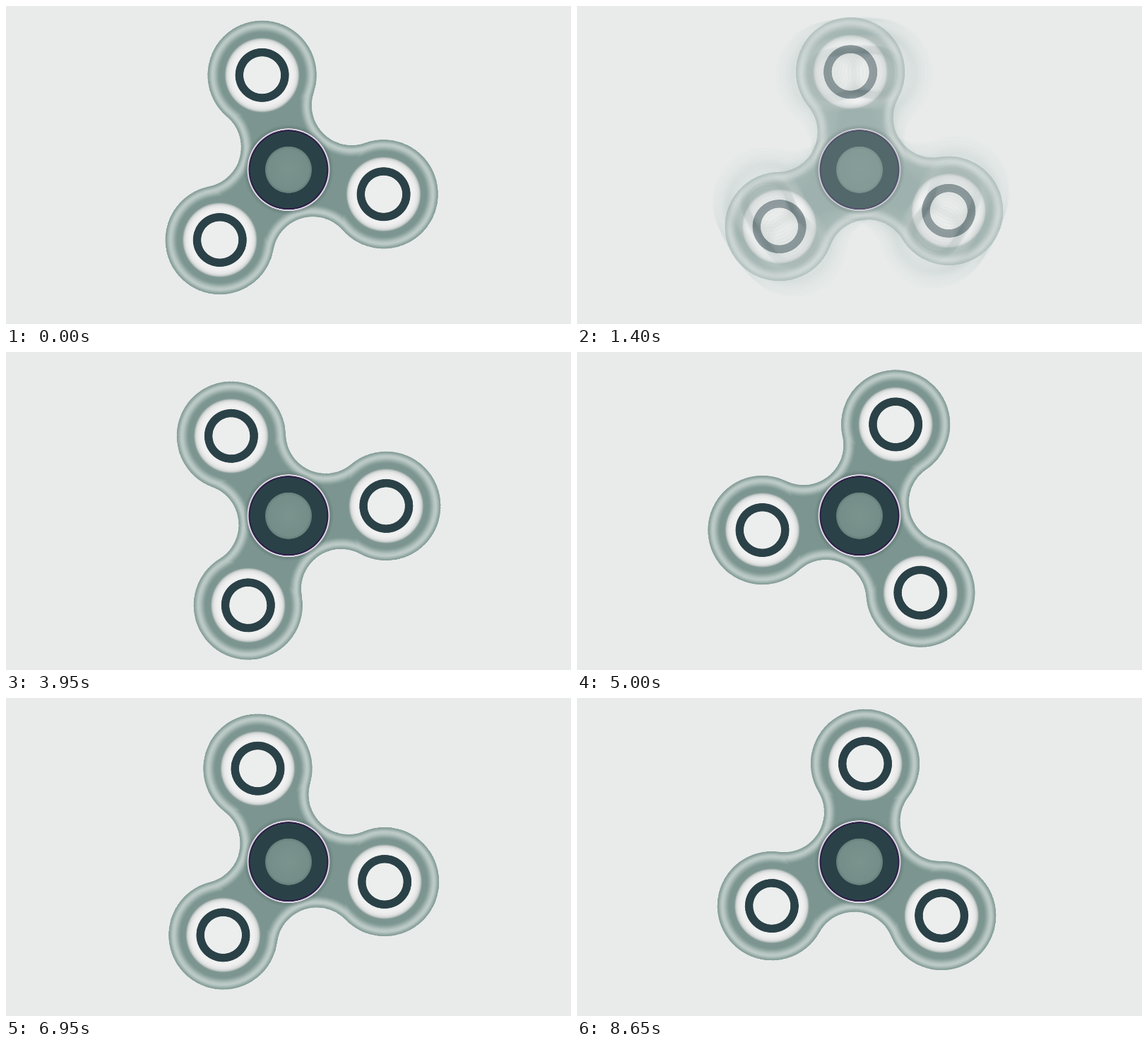
An HTML page with a canvas for the animation above (8.75 s loop, 800 px wide and 450 px high).

```html
<!DOCTYPE html>
<html lang="en">
<head>
<meta charset="utf-8">
<title>Spinner</title>
<style>
  html, body { margin: 0; width: 100%; height: 100%; overflow: hidden; background: #e8ebea; }
  canvas { display: block; width: 800px; height: 450px; }
</style>
</head>
<body>
<canvas id="stage" width="800" height="450"></canvas>
<script>
const LOOP = 8750, STEP = 50, LAST_STEP = 173;
const ARM = 139, LOBE = 77, FILLET_DIST = 127.7, FILLET = 56.7;
const BACK = '#e8ebea', BODY = '#7c9590', DARK = '#2a4147';
const RAD = Math.PI / 180;
const ctx = document.getElementById('stage').getContext('2d');

// A quick flick, then a long coast: [step, degrees left to turn, degrees per step]
const spin = [
  [0, 5384.4, 13.3], [28, 4074.7, 57], [52, 2770.8, 49], [79, 1644.3, 36],
  [122, 482.1, 18.3], [156, 66.8, 5.9], [163, 31.6, 4.2], [173, 3.3, 1.5]
];

function angleAt(step) {
  const i = Math.min(spin.findLastIndex(k => k[0] <= step), spin.length - 2);
  const [s0, a0, v0] = spin[i], [s1, a1, v1] = spin[i + 1];
  const h = s1 - s0, u = (step - s0) / h, w = 1 - u;
  return a0 * w * w * (1 + 2 * u) + a1 * u * u * (3 - 2 * u)
    - v0 * h * u * w * w + v1 * h * u * u * w;
}

const ramp = (t, from, to) => {
  const u = Math.min(1, Math.max(0, (t - from) / (to - from)));
  return u * u * (3 - 2 * u);
};

const blurAt = time => ramp(time, 450, 1000) * (1 - ramp(time, 1850, 2500));

const polar = (r, deg) => [r * Math.sin(deg * RAD), -r * Math.cos(deg * RAD)];

function disc(c, x, y, r, fill) {
  c.beginPath();
  c.arc(x, y, r, 0, 2 * Math.PI);
  c.fillStyle = fill;
  c.fill();
}

function radial(c, x, y, r, stops) {
  const g = c.createRadialGradient(x, y, 0, x, y, r);
  stops.forEach(([at, color]) => g.addColorStop(at / r, color));
  return g;
}

function outline() {
  const path = new Path2D();
  for (let lobe = 0; lobe < 360; lobe += 120) {
    const [x, y] = polar(ARM, lobe);
    const [fx, fy] = polar(FILLET_DIST, lobe + 60);
    const [px, py] = polar(FILLET_DIST, lobe - 60);
    const [nx, ny] = polar(ARM, lobe + 120);
    path.arc(x, y, LOBE, Math.atan2(py - y, px - x), Math.atan2(fy - y, fx - x));
    path.arc(fx, fy, FILLET, Math.atan2(y - fy, x - fx), Math.atan2(ny - fy, nx - fx), true);
  }
  path.closePath();
  return path;
}

function sprite(half, paint) {
  const canvas = document.createElement('canvas');
  canvas.width = canvas.height = half * 4;
  const c = canvas.getContext('2d');
  c.scale(2, 2);
  c.translate(half, half);
  paint(c);
  return { canvas, half };
}

// Body shade by distance from the rim: a soft highlight just inside the edge.
function rimColor(d) {
  const light = d < 7 ? 0.1 + 0.58 * ramp(d, 0, 7) : 0.68 * (1 - ramp(d, 7, 18));
  const mix = (a, b) => Math.round(a + (b - a) * light);
  return `rgb(${mix(124, 218)},${mix(149, 227)},${mix(144, 224)})`;
}

const body = sprite(225, c => {
  const path = outline();
  c.save();
  c.fillStyle = BODY;
  c.fill(path);
  c.clip(path);
  for (let d = 20; d >= 1; d -= 0.5) {
    c.lineWidth = d * 2;
    c.strokeStyle = rimColor(d);
    c.stroke(path);
  }
  c.restore();
  for (let lobe = 0; lobe < 360; lobe += 120) {
    const [x, y] = polar(ARM, lobe);
    disc(c, x, y, 54, radial(c, x, y, 54, [
      [0, '#f0f0f0'], [43, '#f0f0f0'], [48, '#e4e5e5'], [51, '#c7cccb'], [54, 'rgba(125,150,144,0)']
    ]));
    disc(c, x, y, 38, DARK);
    disc(c, x, y, 26.5, '#eceeed');
  }
});

const hub = sprite(65, c => {
  disc(c, 0, 0, 64, radial(c, 0, 0, 64, [
    [0, 'rgba(75,98,97,.45)'], [58, 'rgba(75,98,97,.4)'], [64, 'rgba(75,98,97,0)']
  ]));
  disc(c, 0, 0, 58.5, '#ddd7e0');
  disc(c, 0, 0, 56.5, '#2c1e49');
  disc(c, 0, 0, 54.5, DARK);
  disc(c, 0, 0, 33, radial(c, 0, 0, 33, [
    [0, '#7b948e'], [29, '#758e89'], [33, '#657e7a']
  ]));
});

function stamp({ canvas, half }, deg, alpha) {
  ctx.save();
  ctx.translate(400, 231.7);
  ctx.rotate(deg * RAD);
  ctx.globalAlpha = alpha;
  ctx.drawImage(canvas, -half, -half, half * 2, half * 2);
  ctx.restore();
}

function draw(time) {
  const tick = Math.floor(time / STEP);
  // The first and the last pose are held for two steps.
  const step = tick === 1 ? 0 : Math.min(LAST_STEP, tick);
  const angle = angleAt(step) % 120;
  const blur = blurAt(step * STEP);
  ctx.globalAlpha = 1;
  ctx.fillStyle = BACK;
  ctx.fillRect(0, 0, 800, 450);
  if (blur > 0) {
    for (let offset = -12; offset <= 16; offset += 2) stamp(body, angle + offset, 0.038 * blur);
  }
  stamp(body, angle, 1 - 0.56 * blur);
  stamp(hub, 0, 1 - 0.35 * blur);
}

const start = performance.now();
function animate() {
  draw((performance.now() - start) % LOOP);
  requestAnimationFrame(animate);
}
animate();
</script>
</body>
</html>
```
